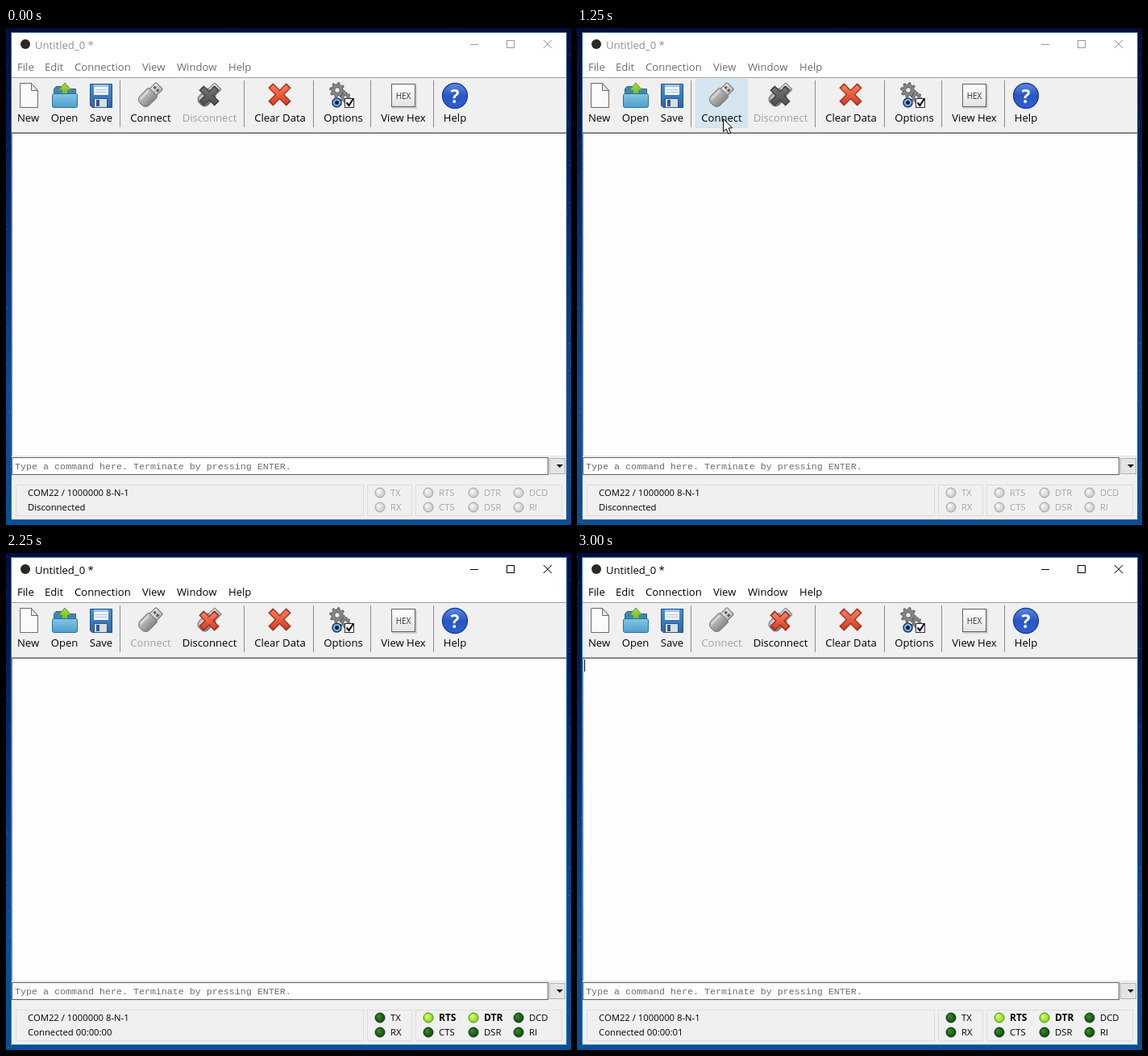
These frames come from a looping animation (701x616 px, 3.25 s). An HTML page with a canvas:

```html
<!DOCTYPE html>
<html lang="en">
<head>
<meta charset="utf-8">
<title>Serial terminal</title>
<style>
html, body { margin: 0; width: 100%; height: 100%; overflow: hidden; background: #06265f; }
canvas { display: block; }
</style>
</head>
<body>
<canvas id="stage" width="701" height="616"></canvas>
<script>
const ctx = document.getElementById('stage').getContext('2d');
const LOOP = 3250;
const UI = '"Open Sans", "Noto Sans", sans-serif';
const MONO = '"Liberation Mono", "Courier New", monospace';
const LABEL = '13.1px ' + UI;
const SMALL = '11.3px ' + UI;

function rect(x, y, w, h, fill) {
  ctx.fillStyle = fill;
  ctx.fillRect(x, y, w, h);
}

function box(x, y, w, h, fill, stroke) {
  rect(x, y, w, h, fill);
  ctx.strokeStyle = stroke;
  ctx.lineWidth = 1;
  ctx.strokeRect(x + .5, y + .5, w - 1, h - 1);
}

function poly(points, fill, stroke, width = 1) {
  ctx.beginPath();
  for (let i = 0; i < points.length; i += 2) ctx.lineTo(points[i], points[i + 1]);
  ctx.closePath();
  paint(fill, stroke, width);
}

function paint(fill, stroke, width = 1) {
  if (fill) { ctx.fillStyle = fill; ctx.fill(); }
  if (stroke) { ctx.strokeStyle = stroke; ctx.lineWidth = width; ctx.stroke(); }
}

function round(x, y, w, h, r, fill, stroke) {
  ctx.beginPath();
  ctx.roundRect(x, y, w, h, r);
  paint(fill, stroke);
}

function disc(x, y, r, fill, stroke, width) {
  ctx.beginPath();
  ctx.arc(x, y, r, 0, Math.PI * 2);
  paint(fill, stroke, width);
}

function line(x1, y1, x2, y2, color, width = 1) {
  ctx.beginPath();
  ctx.moveTo(x1, y1);
  ctx.lineTo(x2, y2);
  paint(null, color, width);
}

function text(str, x, y, color, font = LABEL, align = 'left') {
  ctx.font = font;
  ctx.textAlign = align;
  ctx.fillStyle = color;
  ctx.fillText(str, x, y);
}

function shade(x1, y1, x2, y2, ...colors) {
  const g = ctx.createLinearGradient(x1, y1, x2, y2);
  colors.forEach((c, i) => g.addColorStop(i / (colors.length - 1), c));
  return g;
}

function desktop() {
  rect(0, 0, 701, 616, shade(0, 0, 0, 616, '#020d3c', '#04205f', '#07367f', '#0a4c98', '#0a4f94'));
  let seed = 7;
  const rnd = () => (seed = seed * 16807 % 2147483647) / 2147483647;
  for (let i = 0; i < 90; i++) {
    const x = rnd() < .5 ? rnd() * 7 : 695 + rnd() * 6;
    rect(Math.floor(x), Math.floor(rnd() * 616), 1, 1, 'rgba(120,175,230,.35)');
  }
}

function frame(active) {
  rect(6, 5, 690, 605, active ? '#2f83bd' : '#3c5f8c');
  rect(7, 6, 688, 55, '#fff');
  rect(7, 61, 688, 1, '#a0a0a0');
  rect(7, 62, 688, 67, '#f0f0f0');
  rect(7, 129, 688, 1, '#a0a0a0');
  rect(7, 130, 688, 1, '#696969');
  rect(7, 131, 688, 400, '#fdfdfd');
  rect(7, 131, 1, 399, '#8a8a8a');
  rect(7, 530, 688, 1, '#e3e3e3');
  rect(7, 531, 688, 78, '#f0f0f0');

  disc(24, 20, 6, '#2a2a20');
  text('Untitled_0 *', 36, 26, active ? '#000' : '#909090');
  const ink = active ? '#000' : '#999';
  rect(576, 20, 10, 1, ink);
  ctx.strokeStyle = ink;
  ctx.lineWidth = 1;
  ctx.strokeRect(621.5, 15.5, 9, 9);
  line(667, 15, 677, 25, ink);
  line(677, 15, 667, 25, ink);

  const menu = { File: 14, Edit: 48, Connection: 85, View: 169, Window: 212, Help: 276 };
  for (const name in menu) text(name, menu[name], 53, active ? '#000' : '#6d6d6d');
}

function cross(x, y, r, light, mid, dark) {
  ctx.lineCap = 'butt';
  for (const [w, color, e] of [[8.5, dark, 1.2], [6, shade(x, y - r, x, y + r, light, mid), 0]]) {
    line(x - r - e, y - r - e, x + r + e, y + r + e, color, w);
    line(x + r + e, y - r - e, x - r - e, y + r + e, color, w);
  }
}

function usb(x, y, size, light, dark) {
  ctx.save();
  ctx.translate(x, y);
  ctx.rotate(-Math.PI / 4);
  ctx.scale(size, size);
  round(4, -6, 12, 12, 1, shade(0, -6, 0, 6, '#e8e8e8', '#b4b4b4'), '#777');
  rect(9, -4, 3, 3, '#555');
  rect(9, 1, 3, 3, '#555');
  round(-16, -8, 21, 16, [6, 2, 2, 6], shade(0, -8, 0, 8, light, dark), '#777');
  line(-12, -5, 2, -5, 'rgba(255,255,255,.45)', 2);
  ctx.restore();
}

function gear(x, y, r, teeth) {
  ctx.beginPath();
  for (let i = 0; i < teeth * 4; i++) {
    const a = (i + .5) / (teeth * 4) * Math.PI * 2;
    const d = i % 4 < 2 ? r : r * .72;
    ctx.lineTo(x + d * Math.cos(a), y + d * Math.sin(a));
  }
  ctx.closePath();
  paint('#858585', '#5c5c5c');
  disc(x, y, r * .35, '#f0f0f0', '#5c5c5c');
}

function newIcon() {
  poly([17.5, 68.5, 31.5, 68.5, 39.5, 77.5, 39.5, 98.5, 17.5, 98.5], shade(17, 68, 39, 98, '#fff', '#f8f8f8'), '#6a6a6a');
  poly([31.5, 68.5, 31.5, 77.5, 39.5, 77.5], '#e8e8e8', '#6a6a6a');
}

function openIcon() {
  poly([59.5, 75.5, 62, 72.5, 70, 72.5, 72, 75.5, 86.5, 75.5, 86.5, 96, 59.5, 96], '#3e87b5', '#2b678f');
  poly([73, 68, 81, 77, 76.5, 77, 76.5, 84, 69.5, 84, 69.5, 77, 65, 77], shade(0, 68, 0, 84, '#a5dc4c', '#6db52a'), '#579322');
  round(57.5, 81.5, 31, 17, 2, shade(0, 81, 0, 99, '#86c6e6', '#4a9ecb'), '#2b6f9c');
}

function saveIcon() {
  poly([104.5, 69.5, 131.5, 69.5, 131.5, 98.5, 107, 98.5, 104.5, 96], shade(0, 69, 0, 99, '#4a91d0', '#2a66ad'), '#1e4d88');
  rect(109, 70, 18, 13, '#f1f6fa');
  rect(109, 70, 18, 3, '#9cc4e4');
  rect(111, 76, 14, 1, '#b4c2ce');
  rect(111, 79, 14, 1, '#b4c2ce');
  box(109, 87, 17, 12, '#d9dee2', '#34557d');
  rect(112, 89, 4, 8, '#2f5c91');
}

function optionsIcon() {
  gear(411, 77, 9.5, 8);
  gear(421, 86, 6.5, 8);
  disc(410.5, 92.5, 5.5, '#78b3e8', '#173d63', 1.5);
  disc(410.5, 92.5, 2.5, '#0c1d30');
  box(420, 87, 12, 12, '#fff', '#333');
  ctx.beginPath();
  ctx.moveTo(422.5, 92.5);
  ctx.lineTo(425.5, 96);
  ctx.lineTo(431, 87.5);
  paint(null, '#000', 2);
}

function hexIcon() {
  rect(479, 70, 31, 30, '#cfcfcf');
  box(478, 69, 30, 29, shade(0, 69, 0, 98, '#fff', '#e2e2e2'), '#606060');
  text('HEX', 493, 88, '#333', '10px ' + UI, 'center');
}

function helpIcon() {
  disc(557, 84, 15.5, shade(0, 68, 0, 100, '#5b8ce6', '#2856c5', '#2c60d2'), '#1d3f94', 1.3);
  text('?', 557, 92.5, '#fff', 'bold 23px ' + UI, 'center');
}

function toolbar(hover, active) {
  if (hover) box(147, 63, 65, 61, '#d6e6f1', '#cbe0ee');
  for (const x of [141, 295, 381, 452, 530]) rect(x, 65, 1, 58, '#8c8c8c');
  newIcon();
  openIcon();
  saveIcon();
  usb(179, 83, 1, '#c9c9c9', '#858585');
  usb(252, 83, .97, active ? '#c0c0c0' : '#a5a5a5', active ? '#7d7d7d' : '#6a6a6a');
  if (active) cross(252, 84, 8.5, '#f57d5c', '#d8452b', '#9f2a1b');
  else cross(252, 84, 8.5, '#707070', '#555', '#404040');
  cross(339.5, 82.5, 10, '#f5795a', '#d7432a', '#a82d1d');
  optionsIcon();
  hexIcon();
  helpIcon();

  const off = '#a2a2a2';
  const labels = [
    ['New', 27.5], ['Open', 72.5], ['Save', 118], ['Connect', 179.5, active], ['Disconnect', 252.5, !active],
    ['Clear Data', 340], ['Options', 418.5], ['View Hex', 493], ['Help', 557]
  ];
  for (const [name, x, dim] of labels) text(name, x, 116, dim ? off : '#000', LABEL, 'center');
}

function commandBar() {
  box(7, 532, 666, 22, '#fff', '#626262');
  text('Type a command here. Terminate by pressing ENTER.', 11, 547, '#6e6e6e', '11.67px ' + MONO);
  box(674, 533, 20, 20, '#e4e4e4', '#b4b4b4');
  poly([683, 541, 691, 541, 687, 545], '#000');
}

const LEDS = {
  none: ['#fafafa', '#c2c2c2', '#a5a5a5'],
  off: ['#3c8a2c', '#0d450c', '#123c10'],
  on: ['#e2ff7c', '#72d40c', '#4d8f16']
};

function led(name, x, y, state) {
  const [light, base, rim] = LEDS[state];
  const g = ctx.createRadialGradient(x - 2, y - 2, .5, x, y, 6.5);
  g.addColorStop(0, light);
  g.addColorStop(1, base);
  disc(x, y, 6, g, rim);
  if (state === 'none') {
    text(name, x + 14, y + 5, '#fff', SMALL);
    text(name, x + 13, y + 4, '#a0a0a0', SMALL);
  } else {
    text(name, x + 13, y + 4, '#000', state === 'on' ? 'bold 12px ' + UI : SMALL);
  }
}

function statusBar(t, active) {
  for (const [x, w] of [[12, 432], [448, 56], [508, 182]]) box(x, 566, w, 39, '#f0f0f0', '#dcdcdc');
  text('COM22 / 1000000 8-N-1', 27, 580, '#000', SMALL);
  const linked = t >= 1750;
  const clock = t >= 2750 ? '00:00:01' : '00:00:00';
  text(linked ? 'Connected ' + clock : 'Disconnected', 27, 598, '#000', SMALL);
  const data = linked ? 'off' : 'none';
  const low = active ? 'off' : 'none';
  const high = active ? 'on' : 'none';
  led('TX', 464, 576, data);
  led('RX', 464, 594, data);
  led('RTS', 524, 576, high);
  led('CTS', 524, 594, low);
  led('DTR', 580, 576, high);
  led('DSR', 580, 594, low);
  led('DCD', 636, 576, low);
  led('RI', 636, 594, low);
}

function arrow(x, y) {
  ctx.save();
  ctx.translate(x + .5, y + .5);
  poly([0, 0, 0, 16, 3.7, 12.6, 6.2, 18.5, 9, 17.3, 6.6, 11.5, 11, 11.3], '#fff', '#000');
  ctx.restore();
}

function beam(x, y) {
  rect(x - 21, y - 15, 32, 25, '#fff');
  rect(x, y - 7, 1, 15, '#e2e2e2');
  rect(x - 3, y - 8, 7, 1, '#ececec');
  rect(x - 3, y + 8, 7, 1, '#ececec');
}

// Pointer stops: start time, shape, x, y
const POINTER = [
  [0], [250, arrow, 338, 536], [500, beam, 230, 236], [750, arrow, 183, 123],
  [1000, arrow, 176, 112], [1250, arrow, 181, 112], [1500, arrow, 181, 114],
  [2000, beam, 197, 150], [2250]
];

function draw(t) {
  const active = t >= 1500;
  desktop();
  frame(active);
  toolbar(t >= 1000 && t < 1500, active);
  commandBar();
  statusBar(t, active);
  if (active && (t < 2250 || t >= 2750)) rect(9, 132, 1, 15, '#000');
  const [, shape, x, y] = POINTER.findLast(p => p[0] <= t);
  if (shape) shape(x, y);
}

const start = performance.now();
function tick() {
  draw((performance.now() - start) % LOOP);
  requestAnimationFrame(tick);
}
tick();
</script>
</body>
</html>
```
